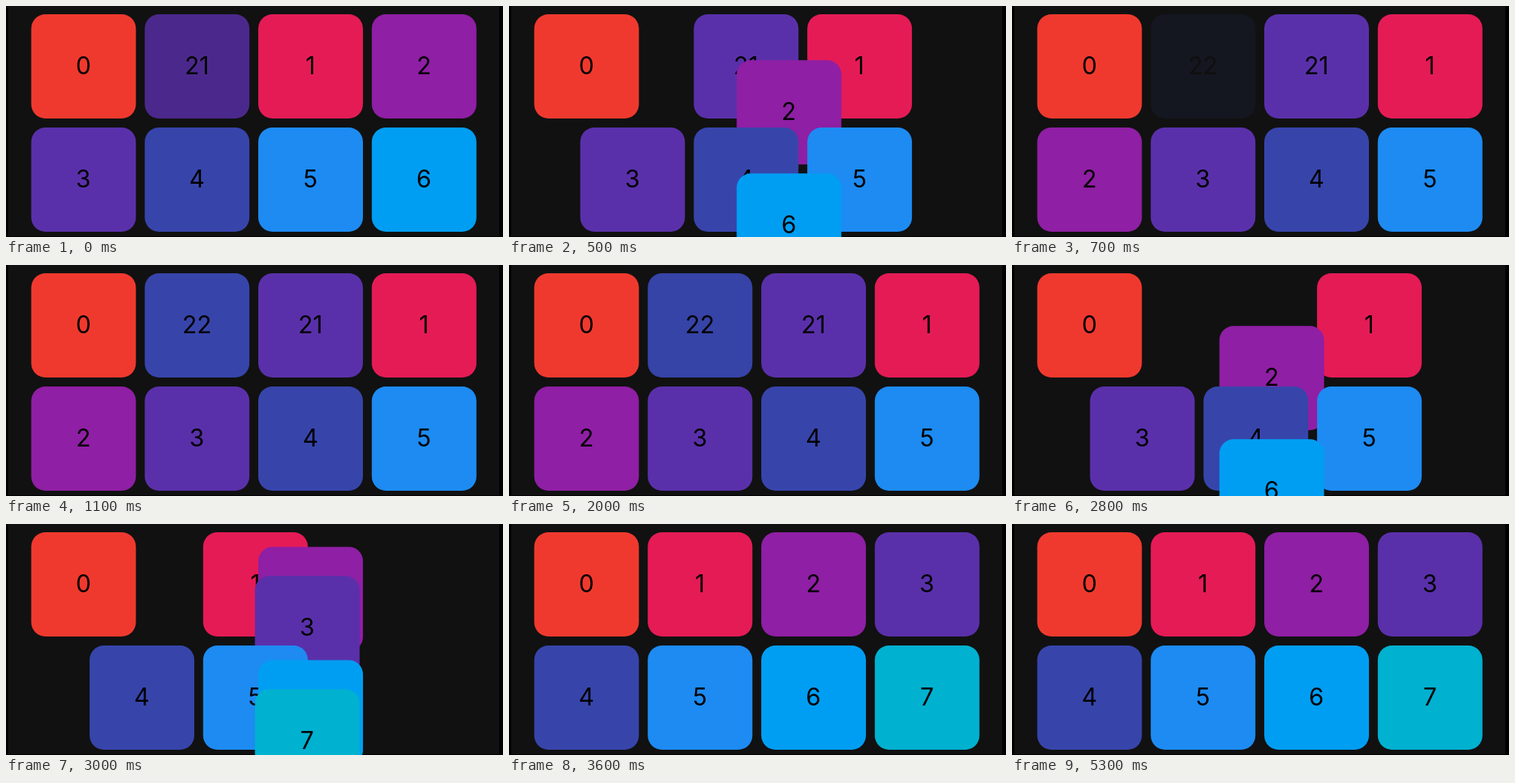
Recreate the animation shown at these times as an HTML page. Size 660 by 308 pixels, loop 5400 ms.

```html
<!DOCTYPE html>
<html lang="en">
<head>
<meta charset="utf-8">
<title>Animated grid</title>
<style>
  html, body { margin: 0; width: 100%; height: 100%; overflow: hidden; background: #000; }
  #stage { position: relative; width: 660px; height: 308px; overflow: hidden; background: #000; }
  #panel { position: absolute; left: 3px; top: 0; width: 652px; height: 307px; background: #111; }
  .tile {
    position: absolute; left: 0; top: 0; width: 138.5px; height: 138.5px;
    border-radius: 19px; color: #000; text-align: center;
    font: 400 32px/138.5px Inter, "Open Sans", sans-serif;
  }
</style>
</head>
<body>
<div id="stage"><div id="panel"></div></div>
<script>
const LOOP = 5400, DURATION = 300, COLUMNS = 4;
const COLORS = ['#f0392e', '#e51b56', '#8f1fa4', '#5a30aa', '#3745ab', '#1d8bf2', '#009ef2', '#00b1d0'];

// Each move shifts every following tile by one or more slots.
const MOVES = [
  { at: 370, offset: 1 },
  { at: 2644, offset: 0 },
  { at: 2828, offset: -1 }
];

// slot: place at the start of the loop; moves: follows the shifts
const tiles = [
  { label: 0, slot: 0 },
  { label: 22, slot: 1, fadeIn: 673, fadeOut: 1995 },
  { label: 21, slot: 1, moves: true, fadeIn: -240, fadeOut: 2175 }
];
for (let n = 1; n < 8; n++) tiles.push({ label: n, slot: n + 1, moves: true });

const stage = document.getElementById('stage');
for (const tile of tiles) {
  tile.el = document.createElement('div');
  tile.el.className = 'tile';
  tile.el.textContent = tile.label;
  tile.el.style.background = COLORS[tile.label % 18];
  stage.append(tile.el);
}

const clamp = v => Math.min(1, Math.max(0, v));
const progress = (t, start) => clamp((t - start) / DURATION);
const ease = p => p * p * (3 - 2 * p);

const cell = slot => [
  33.5 + (slot % COLUMNS) * 150.75,
  11 + Math.floor(slot / COLUMNS) * 151
];

// A new move sets off from wherever the previous one has got to.
function position(tile, t, count = tile.moves ? MOVES.length : 0) {
  if (!count) return cell(tile.slot);
  const move = MOVES[count - 1];
  if (t < move.at) return position(tile, t, count - 1);
  const from = position(tile, move.at, count - 1);
  const to = cell(tile.slot + move.offset);
  const k = ease(progress(t, move.at));
  return from.map((v, i) => v + (to[i] - v) * k);
}

function opacity(tile, t) {
  if (tile.fadeOut === undefined) return 1;
  return progress(t, tile.fadeIn) * (1 - progress(t, tile.fadeOut));
}

function draw(now) {
  const t = now % LOOP;
  for (const tile of tiles) {
    const [x, y] = position(tile, t);
    tile.el.style.transform = `translate(${x}px, ${y}px)`;
    tile.el.style.opacity = opacity(tile, t);
  }
}

const start = performance.now();
function tick() {
  draw(performance.now() - start);
  requestAnimationFrame(tick);
}
tick();
</script>
</body>
</html>
```
